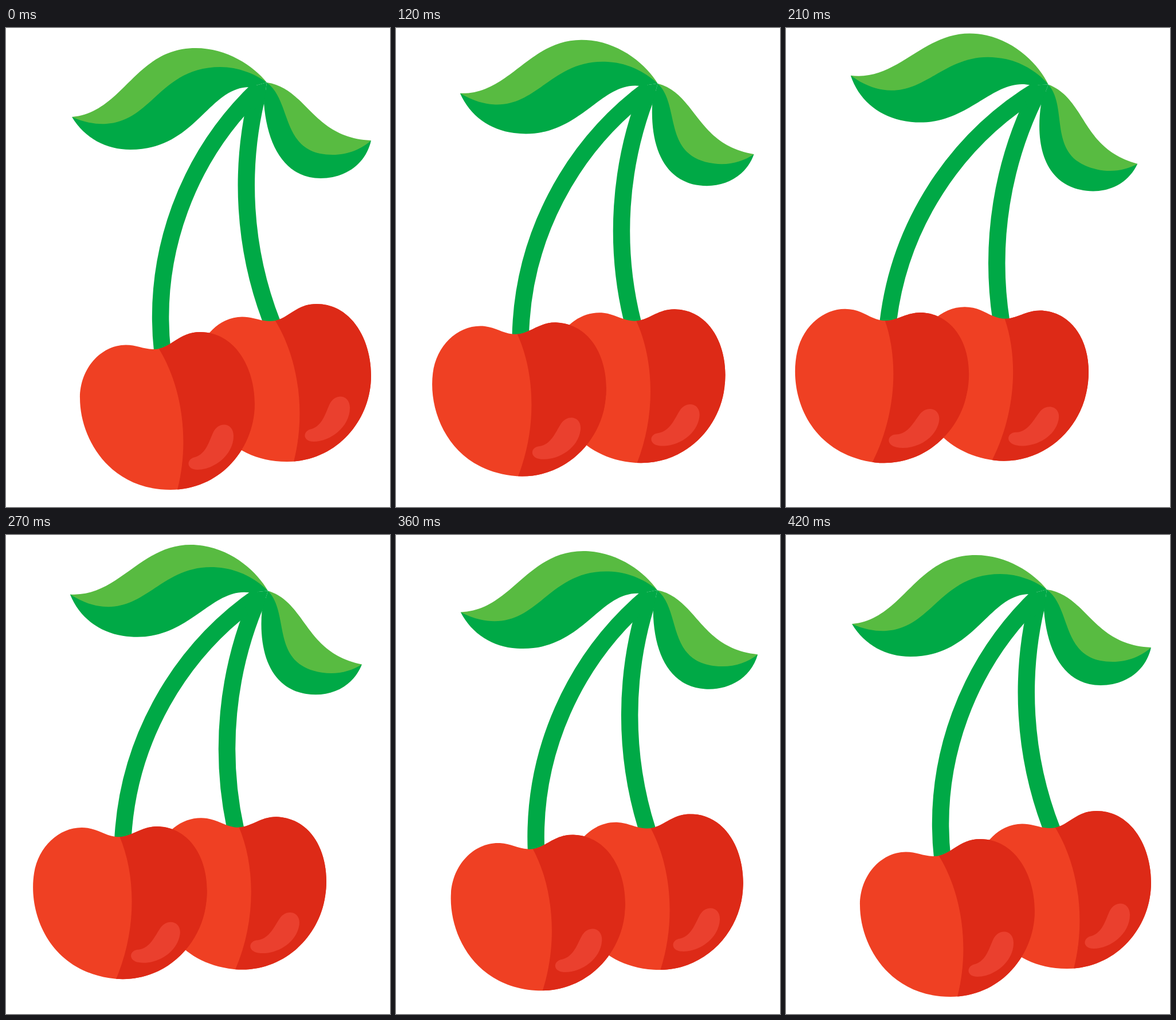
Write an HTML page that moves like this. It is 670x835 px and loops after 0.45 s.

```html
<!DOCTYPE html>
<html lang="en">
<head>
<meta charset="utf-8">
<title>Swinging cherries</title>
<style>
  html, body { margin: 0; height: 100%; overflow: hidden; background: #fff; }
  svg { display: block; width: 100%; height: 100%; }
  .leaf { fill: #00a946; }
  .shine { fill: #58bb41; }
  .stem { fill: none; stroke: #00a946; stroke-width: 29.5; }
</style>
</head>
<body>
<svg viewBox="0 0 670 835">
  <defs>
    <path id="body" d="M258 560C240 560 228 552.5 209 552.5C165 553 129 594 129 645C129 715 180 805 287 805C373 805 434 734 434 655C434 590 398 530 339 530C300 530 288 560 258 560Z"/>
    <clipPath id="inside"><use href="#body"/></clipPath>
    <g id="cherry">
      <use href="#body" fill="#ef4023"/>
      <path clip-path="url(#inside)" fill="#dd2a17" d="M262 551L266 558C305 620 322 715 299 805V820H450V500H262Z"/>
      <path fill="#ea402e" d="M362 704C372 685 397 688 397 711C397 745 362 770 334 770C314 770 314 751 330 748C350 742 355 718 362 704Z"/>
    </g>
  </defs>
  <g id="bunch">
    <path class="stem" d="M467 521A660 660 0 0 1 441.5 105"/>
    <use href="#cherry" x="203" y="-49"/>
    <path class="stem" d="M273 565A550 550 0 0 1 442 105"/>
    <use href="#cherry"/>

    <!-- The light halves reach a little under the dark ones. -->
    <path class="shine" d="M115 155C205 147 225 35 331 35C385 35 432 66 455 95C435 84 405 74 374 74C275 74 258 172 175 172C160 172 140 170 115 155Z"/>
    <path class="leaf" d="M115 155C140 166 160 168 175 167C255 162 270 68 374 68C405 68 435 80 455 95L425 103C353 103 331 212 217 212C175 212 137 192 115 155Z"/>
    <path class="shine" d="M455 95C525 105 535 192 637 196C622 214 597 226 570 226C474 226 494 130 455 95Z"/>
    <path class="leaf" d="M455 95C500 128 478 221 570 221C597 221 620 211 637 196C628 237 592 262 549 262C490 262 456 210 450 131Z"/>
    <path class="leaf" d="M425 103L455 95L450 131L430 145L417 125Z"/>
  </g>
</svg>
<script>
  const STEP_MS = 30, HALF = 7, STEPS = 15, DEGREES = 1.8;
  const bunch = document.getElementById('bunch');

  // Swing out by equal steps and back again.
  function draw(now) {
    const step = Math.floor(now / STEP_MS) % STEPS;
    const angle = DEGREES * (HALF - Math.abs(HALF - step));
    bunch.setAttribute('transform', `rotate(${angle} 441 109)`);
    requestAnimationFrame(draw);
  }
  draw(0);
</script>
</body>
</html>
```
